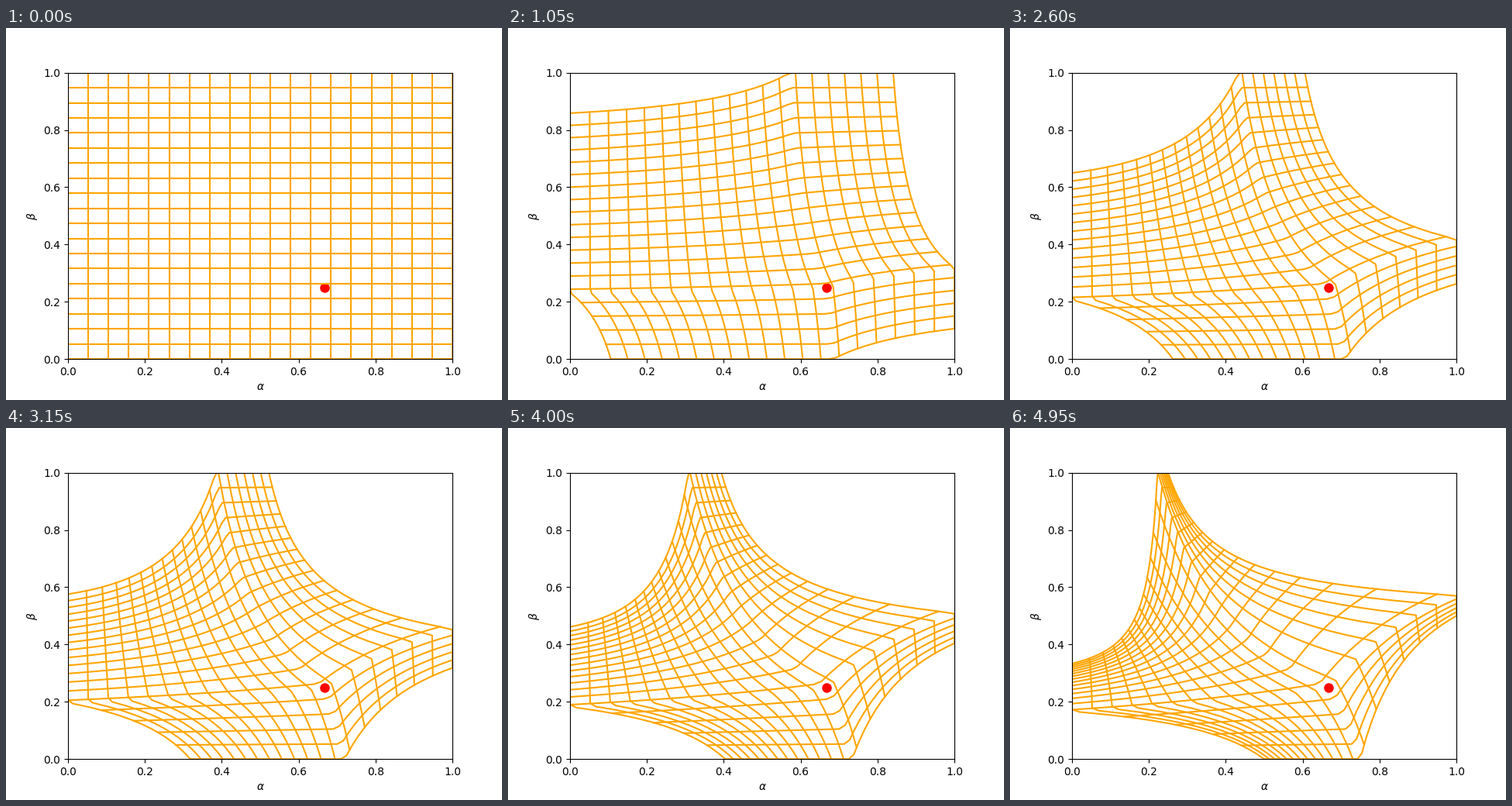
A matplotlib script for the animation above (5000 ms loop, 640 px wide and 480 px high).

```python
import numpy as np
import matplotlib.pyplot as plt
from matplotlib.animation import FuncAnimation

FRAMES = 100
INTERVAL = 50
GRID_LINES = 20
SAMPLES = 50


def improve(p, gain):
    """Nash update of the probability p of the first of two actions.

    gain is the payoff advantage of the first action over the second.
    """
    up = np.maximum(0, (1 - p) * gain)
    down = np.maximum(0, -p * gain)
    return (p + up) / (1 + up + down)


def nash_map(a, b):
    return improve(a, 1 - 4 * b), improve(b, 3 * a - 2)


def blend(a, b, t):
    """Move from the identity (t=0) to the Nash map (t=1)."""
    na, nb = nash_map(a, b)
    return (1 - t) * a + t * na, (1 - t) * b + t * nb


fig, ax = plt.subplots(figsize=(6.4, 4.8), dpi=100)
ax.set_xlim(0, 1)
ax.set_ylim(0, 1)
ax.set_xlabel(r"$\alpha$")
ax.set_ylabel(r"$\beta$")

# The equilibrium stays fixed, beneath the grid.
ax.scatter([2 / 3], [1 / 4], s=64, color="red", zorder=1)

s = np.linspace(0, 1, SAMPLES)
curves = []
for c in np.linspace(0, 1, GRID_LINES):
    level = np.full(SAMPLES, c)
    curves += [(level, s), (s, level)]
lines = [ax.plot(a, b, color="orange", lw=1.5)[0] for a, b in curves]


def update(i):
    t = i / (FRAMES - 1)
    for line, (a, b) in zip(lines, curves):
        line.set_data(*blend(a, b, t))
    return lines


anim = FuncAnimation(fig, update, frames=FRAMES, interval=INTERVAL,
                     repeat=True, repeat_delay=0)
plt.show()
```
